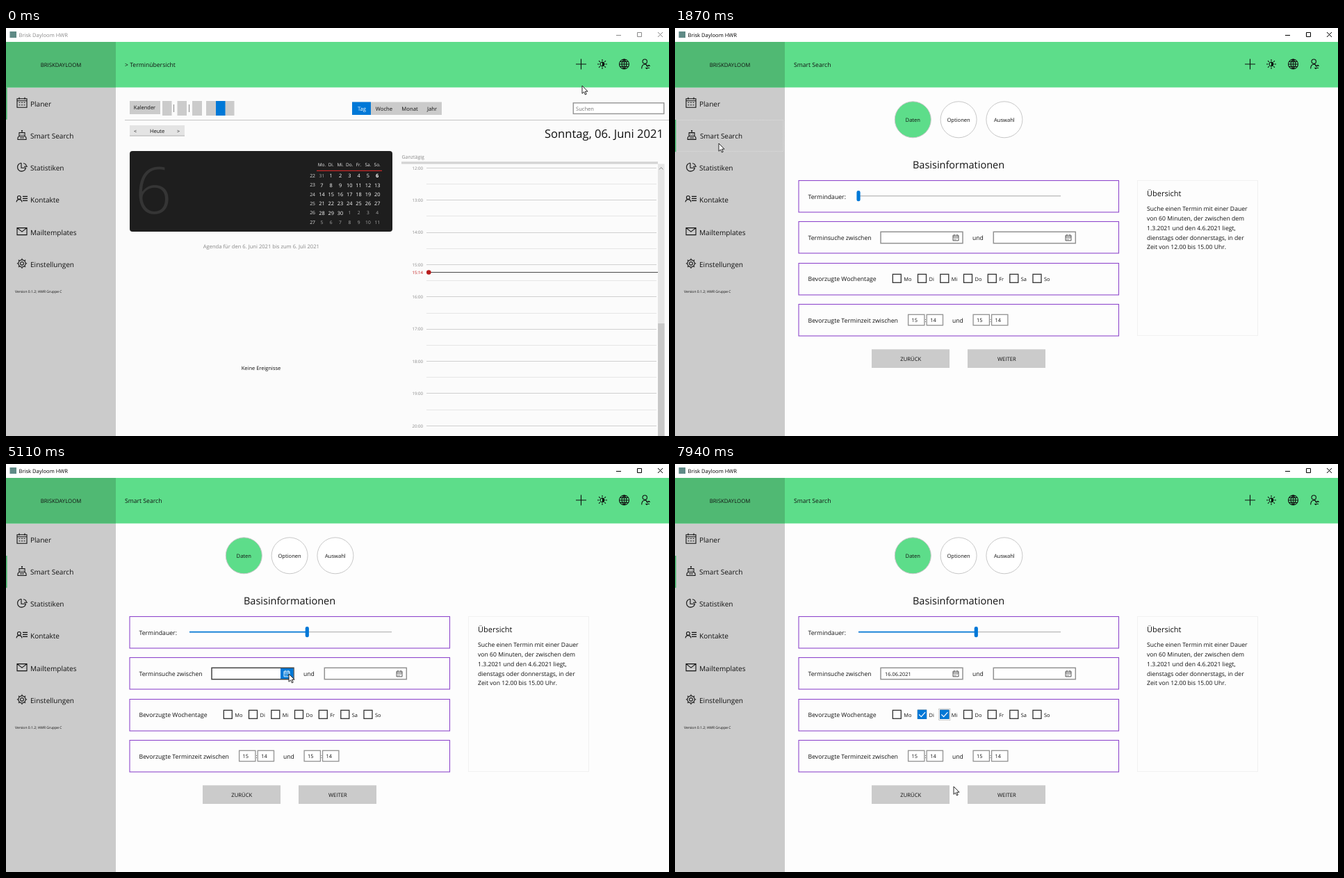
An HTML page that plays this animation: 954x587 px, repeating every 8000 ms.

```html
<!DOCTYPE html>
<html lang="de">
<head>
<meta charset="utf-8">
<title>Brisk Dayloom HWR</title>
<style>
html, body { margin: 0; width: 100%; height: 100%; overflow: hidden; background: #fff; }
svg { display: block; width: 954px; height: 587px; font-family: "Open Sans", "Noto Sans", sans-serif; text-rendering: geometricPrecision; }
text { white-space: pre; }
.icon { fill: none; stroke: #111; stroke-width: 1.1; }
</style>
</head>
<body>
<svg id="stage" viewBox="0 0 954 587"></svg>
<script>
const BLUE = '#0078d7', GRAY = '#cbcbcb', GREEN = '#5ddd8a';

const text = (x, cy, size, str, fill = '#111', anchor = 'start', extra = '') =>
  `<text x="${x}" y="${cy + size * 0.36}" font-size="${size}" fill="${fill}" text-anchor="${anchor}" ${extra}>${str}</text>`;
const mid = (x, cy, size, str, fill, extra) => text(x, cy, size, str, fill, 'middle', extra);
const rect = (x, y, w, h, fill, extra = '') =>
  `<rect x="${x}" y="${y}" width="${w}" height="${h}" fill="${fill}" ${extra}/>`;
const frame = (x, y, w, h, stroke, sw = 1, extra = '') =>
  rect(x, y, w, h, 'none', `stroke="${stroke}" stroke-width="${sw}" ${extra}`);
const line = (d, stroke, sw = 1, extra = '') =>
  `<path d="${d}" fill="none" stroke="${stroke}" stroke-width="${sw}" ${extra}/>`;
const icon = (x, y, d) => `<path class="icon" transform="translate(${x} ${y})" d="${d}"/>`;
const group = (id, body, extra = '') => `<g id="${id}" ${extra}>${body}</g>`;
const circle = r => `M${-r} 0a${r} ${r} 0 1 0 ${2 * r} 0a${r} ${r} 0 1 0 ${-2 * r} 0`;
const spokes = (n, r1, r2) => Array.from({ length: n }, (_, i) => {
  const a = i * 2 * Math.PI / n, c = Math.cos(a), s = Math.sin(a);
  return `M${c * r1} ${s * r1}L${c * r2} ${s * r2}`;
}).join('');

// Month sheet for June 2021, starting on Monday 31 May
function monthGrid(x, y, dx, dy, size, ink, dim, weekInk) {
  let out = '';
  for (let i = 0; i < 42; i++) {
    const col = i % 7, row = Math.floor(i / 7), june = i > 0 && i < 31;
    const day = i === 0 ? 31 : june ? i : i - 30;
    if (!col) out += mid(x - dx, y + row * dy, size * 0.93, 22 + row, weekInk);
    out += mid(x + col * dx, y + row * dy, june ? size : size * 0.9, day, june ? ink : dim,
      i === 6 ? 'font-weight="700"' : '');
  }
  return out;
}
const weekdays = ['Mo', 'Di', 'Mi', 'Do', 'Fr', 'Sa', 'So'];

function titleBar() {
  return rect(0, 0, 954, 20, '#fff') + rect(5.5, 5, 9.5, 9, '#5f8a85') +
    group('title', text(18.5, 10, 7.6, 'Brisk Dayloom HWR', 'currentColor') +
      line('M878 10.5h7M908.5 6.5h6v6h-6zM938 6l7 7M945 6l-7 7', 'currentColor'));
}

function header() {
  const user = `M-4.3 7.5c0-8 8.2-8 8.5-2.5` + `M-3-2.8a3.2 3.2 0 1 0 6.4 0a3.2 3.2 0 1 0-6.4 0` +
    'M2 3.5h5l-1.5-1.5M7 6.5h-5l1.5 1.5';
  return rect(0, 20, 954, 65.5, GREEN) + rect(0, 20, 158, 65.5, '#50b973') +
    mid(79, 53, 7.8, 'BRISKDAYLOOM') +
    icon(827.5, 52, 'M-7.5 0h15M0-7.5v15') +
    icon(858, 52, circle(2.9) + spokes(8, 4.5, 7)) +
    `<path d="M858 49a3 3 0 0 1 0 6z"/>` +
    icon(889.5, 52, circle(7) + 'M-7 0h14M-6-3.5h12M-6 3.5h12M0-7v14M0-7c-4.5 4-4.5 10 0 14M0-7c4.5 4 4.5 10 0 14') +
    icon(919, 51, user);
}

function sidebar() {
  const glyphs = [
    'M-7-6h14v12.5h-14zM-7-3h14M-4-8v3M4-8v3M-4.5-.5h2M-1-.5h2M2.5-.5h2M-4.5 3h2M-1 3h2M2.5 3h2',
    'M-4-3.5h8v5h-8zM-2-1h1M1-1h1M0-3.5v-3M-1-6.5h2M-6 6.5v-2c0-2 2-3 3-3h6c1 0 3 1 3 3v2zM-3 4h6',
    'M-1-6a6 6 0 1 0 6.5 7M-1-6v7h7M2-5.5a5 5 0 0 1 4.5 4M3-1h5',
    'M-6.5-2.5a2.4 2.4 0 1 0 4.8 0a2.4 2.4 0 1 0-4.8 0M-8 4c1-5 7-5 8 0M1-4h7M1-1h7M1 2h7',
    'M-7-5h14v10h-14zM-7-5l7 5.5l7-5.5',
    circle(2.3) + circle(5.2) + spokes(8, 5.2, 7.2)
  ];
  const names = ['Planer', 'Smart Search', 'Statistiken', 'Kontakte', 'Mailtemplates', 'Einstellungen'];
  return rect(0, 85.5, 158, 502, GRAY) + names.map((name, i) => {
    const cy = 108.8 + i * 46.2;
    const body = icon(23, cy - 1, glyphs[i]) + text(35, cy + 0.3, 10.05, name);
    return i !== 1 ? body : group('search',
      rect(0, 132, 158, 46, '#999', 'id="press"') +
      frame(0.5, 132, 157, 46, '#e2e2e2', 0.8, 'id="focus" stroke-dasharray="1 1"') + body);
  }).join('') +
    rect(0, 85.5, 1.6, 46.2, '#4bb871', 'id="bar"') +
    text(13, 379.5, 5, 'Version 0.1.2; HWR Gruppe C');
}

function planner() {
  let out = rect(158, 85.5, 796, 502, '#fbfbfb') + text(171, 53, 8.65, '&gt; Terminübersicht');
  out += rect(178, 105, 44, 19, GRAY) + mid(199.5, 114.5, 7.5, 'Kalender');
  for (const [x, w] of [[225, 13.5], [246.5, 13.5], [268, 14], [288, 40.5]]) out += rect(x, 105, w, 21, GRAY);
  out += rect(302, 105, 13.5, 21, BLUE) + line('M241.5 110v11M263.5 110v11', '#888');
  out += rect(498, 106.5, 129, 18.5, GRAY) + rect(498, 106.5, 27, 18.5, BLUE);
  [[512, 'Tag'], [544, 'Woche'], [581, 'Monat'], [613, 'Jahr']].forEach(([x, s], i) =>
    out += mid(x, 116, 7.7, s, i ? '#111' : '#fff'));
  out += rect(816.3, 107.8, 130.4, 15.6, '#fff', 'stroke="#949494" stroke-width="1.4"') + text(820, 116, 7.6, 'Suchen', '#777');
  out += line('M171 132.5h783', '#c4c4c4');
  out += rect(178, 140, 79, 16, '#e4e4e4') + rect(178, 154, 79, 2, '#cfcfcf') +
    mid(186, 148.3, 7, '&lt;') + mid(217.5, 148.3, 7.5, 'Heute') + mid(248, 148.3, 7, '&gt;');
  out += text(946, 152.5, 16.6, 'Sonntag, 06. Juni 2021', '#111', 'end');

  out += rect(178, 177, 378, 116, '#1e1e1e', 'rx="4"');
  out += '<text x="185.5" y="267" font-size="93" font-weight="300" fill="#353535">6</text>';
  weekdays.forEach((d, i) => out += mid(454.4 + 13.3 * i, 197, 6.5, d + '.', '#eee'));
  out += line('M447 205.3h94', '#c62828', 1.3) + monthGrid(454.4, 212.7, 13.3, 13.3, 7.4, '#fff', '#aaa', '#ddd');
  out += mid(367.3, 314, 7.6, 'Agenda für den 6. Juni 2021 bis zum 6. Juli 2021', '#888');
  out += mid(367, 489.5, 7.5, 'Keine Ereignisse');

  out += text(569.5, 185, 7, 'Ganztägig', '#888') + rect(569, 192.3, 369, 3.3, '#d4d4d4');
  for (let i = 0; i < 9; i++) {
    const y = 201.4 + 46.37 * i;
    out += text(600, y, 6.1, `${12 + i}:00`, '#888', 'end') +
      line(`M605 ${Math.floor(y) + 0.5}H936`, '#d0d0d0') + line(`M605 ${Math.floor(y + 23.2) + 0.5}H936`, '#e6e6e6');
  }
  out += text(600, 352.3, 6.1, '15:14', '#c01818', 'end') + line('M605 351.5H938', '#4a4a4a', 1.1) +
    '<circle cx="608.3" cy="351.5" r="3.3" fill="#b71c1c"/>';
  out += rect(938, 195.5, 9.5, 392, '#e6e6e6') + rect(938, 425, 9.5, 162, '#c8c8c8') + line('M940 203.5l2.7-3l2.7 3', '#888');
  return out;
}

const sheetIcon = color => line('M400 298.3h8v7.6h-8zM400 300.6h8M402 297v2M406 297v2M401.5 302.5h1M403.5 302.5h1M405.5 302.5h1M401.5 304.3h1M403.5 304.3h1', color, 0.9);

function search() {
  let out = rect(158, 85.5, 796, 502, '#fdfdfd') + text(171, 53, 8.65, 'Smart Search');
  ['Daten', 'Optionen', 'Auswahl'].forEach((s, i) => {
    const x = 342.3 + 65.8 * i;
    out += `<circle cx="${x}" cy="131.8" r="26" fill="${i ? '#fff' : GREEN}" stroke="#c8c8c8"/>` + mid(x, 132.3, 7.6, s);
  });
  out += mid(408, 196.5, 14.5, 'Basisinformationen');
  for (let i = 0; i < 4; i++) out += frame(178, Math.round(219 + 59.3 * i) + 0.5, 460.5, 45.5, '#8f48cc', 1.1);
  ['Termindauer:', 'Terminsuche zwischen', 'Bevorzugte Wochentage', 'Bevorzugte Terminzeit zwischen'].forEach((s, i) =>
    out += text(191.5, 242.7 + 59.3 * i, 8.7, s));

  out += line('M264 241.6H555', '#b8b8b8', 1.2) + rect(264, 240.8, 0, 1.7, BLUE, 'id="fill"') +
    rect(-2.6, 234, 5.2, 15.3, BLUE, 'id="thumb" rx="2.4"');

  out += rect(296, 293.3, 118, 16.4, '#fff', 'id="from" stroke-width="1.5"') +
    group('fromBtn', rect(395, 294, 18.5, 15, BLUE) + sheetIcon('#fff')) +
    group('fromIcon', sheetIcon('#444')) +
    text(302, 302, 7.4, '16.06.2021', '#111', 'start', 'id="date"');
  out += group('until', text(428, 302, 8.6, 'und') + rect(458.3, 293.3, 118, 16.4, '#fff', 'stroke="#929292" stroke-width="1.5"') +
    `<g transform="translate(162 0)">${sheetIcon('#444')}</g>`);

  const boxes = [313.3, 349.5, 381.8, 415.5, 450.3, 481.8, 515];
  weekdays.forEach((d, i) => {
    const x = boxes[i];
    out += frame(x, 354.3, 12, 12, '#333', 1.3) + text(x + 16, 361, 7.4, d);
    if (i === 1 || i === 2) {
      out += group('check' + d, rect(x - 0.6, 353.7, 13.2, 13.2, BLUE) + line(`M${x + 1.6} 360.3l3.2 3.3l5.8-6.4`, '#fff', 1.2)) +
        frame(x - 2.2, 352.2, 16.4, 16.4, '#888', 0.8, `id="ring${d}" stroke-dasharray="1 1"`);
    }
  });

  [335.6, 362.2, 429.1, 455.6].forEach((x, i) =>
    out += rect(x, 412.3, 23.3, 15.4, '#fff', 'stroke="#929292" stroke-width="1.3"') + text(x + 5, 420.2, 7.4, i % 2 ? 14 : 15));
  out += mid(360.6, 420, 7.4, ':') + mid(454.1, 420, 7.4, ':') + text(399, 420.6, 8.6, 'und');
  out += rect(283, 462.3, 112, 26.7, GRAY) + mid(339.3, 476, 7.7, 'ZURÜCK') +
    rect(421, 462.3, 112, 26.7, GRAY) + mid(477.3, 476, 7.7, 'WEITER');

  out += frame(665.5, 219.5, 173, 223, '#f1f1f1') + text(679, 238, 11, 'Übersicht');
  ['Suche einen Termin mit einer Dauer', 'von 60 Minuten, der zwischen dem', '1.3.2021 und den 4.6.2021 liegt,',
    'dienstags oder donnerstags, in der', 'Zeit von 12.00 bis 15.00 Uhr.'].forEach((s, i) =>
    out += text(679, 260 + 13.8 * i, 8.65, s));

  let popup = rect(295.5, 311.5, 147, 157, '#fff', 'stroke="#c4c4c4"') +
    mid(303, 324, 7.5, '&lt;') + mid(322, 324, 7.6, 'Juni') + mid(341, 324, 7.5, '&gt;') +
    mid(397, 324, 7.5, '&lt;') + mid(416, 324, 7.6, '2021') + mid(435, 324, 7.5, '&gt;');
  weekdays.forEach((d, i) => popup += mid(322.5 + 18.3 * i, 342, 6.5, d, '#666'));
  popup += monthGrid(322.5, 358, 18.3, 19, 7.2, '#111', '#999', '#888');
  return out + group('popup', popup);
}

stage.innerHTML = group('planner', planner()) + group('searchPage', search()) + sidebar() + header() + titleBar();
// Page captions belong above the green header
for (const id of ['planner', 'searchPage']) {
  const caption = document.querySelector(`#${id} > text`);
  caption.id = id + 'Caption';
  stage.append(caption);
}
stage.insertAdjacentHTML('beforeend',
  '<path id="cursor" d="M0 0V11.3L2.6 8.9L4.4 12.9L6.2 12.1L4.4 8.2H8Z" fill="#fff" stroke="#111" stroke-width=".9"/>');

const $ = id => document.getElementById(id);
const show = (id, on) => { $(id).style.display = on ? '' : 'none'; };

// Pointer samples come in runs: first time, last time, count
const ticks = [0];
for (const [a, b, n] of [[120, 1150, 8], [1270, 1990, 7], [2140, 2140, 1], [2390, 3430, 9], [3580, 4540, 8],
  [4690, 5110, 4], [5230, 5620, 4], [5740, 6530, 6], [6650, 6770, 2], [6890, 7820, 8], [7940, 7940, 1]])
  for (let i = 0; i < n; i++) ticks.push(n > 1 ? a + (b - a) * i / (n - 1) : a);

const path = [[0, 829, 83], [120, 838, 72], [400, 862, 46], [560, 770, 62], [1000, 110, 140], [1270, 64, 162],
  [1630, 63, 166], [2140, 63, 166], [2520, 85, 172], [3000, 180, 152], [3430, 244, 160], [3580, 250, 180],
  [3850, 264, 241], [3990, 264, 241], [4540, 422, 245], [4690, 433, 246], [4830, 433, 249], [5110, 407, 302],
  [5350, 407, 303], [5900, 361, 396], [6060, 361, 396], [6530, 342, 291], [6770, 346, 325], [7020, 355, 359],
  [7160, 355, 360], [7420, 387, 360], [7820, 389, 362], [7940, 401, 464], [8000, 401, 464]];

function pointer(t) {
  const i = path.findIndex(p => p[0] > t), [t0, x0, y0] = path[i - 1], [t1, x1, y1] = path[i];
  const k = (t - t0) / (t1 - t0);
  return [x0 + (x1 - x0) * k, y0 + (y1 - y0) * k];
}

function draw(now) {
  const t = now % 8000, tick = ticks.filter(v => v <= t).pop();
  const within = (a, b) => t >= a && t < b;
  const [x, y] = pointer(tick);
  $('cursor').setAttribute('transform', `translate(${x} ${y})`);

  const searching = t >= 1870;
  for (const s of ['', 'Caption']) {
    show('planner' + s, !searching);
    show('searchPage' + s, searching);
  }
  $('bar').setAttribute('y', searching ? 132 : 85.5);
  $('title').style.color = t < 1630 ? '#8a8a8a' : '#000';

  const scale = within(1630, 1870) ? 0.955 : within(1870, 1990) ? 0.98 : 1;
  $('search').setAttribute('transform', `translate(79 155) scale(${scale}) translate(-79 -155)`);
  show('press', within(1630, 1870));
  show('focus', within(1150, 3900));

  const value = tick < 3990 ? 264 : tick < 4690 ? x : 433.3;
  $('thumb').setAttribute('transform', `translate(${value} 0)`);
  $('fill').setAttribute('width', value - 264);

  const hover = within(4960, 5230), editing = within(5230, 7150);
  $('from').setAttribute('stroke', editing ? BLUE : hover ? '#444' : '#929292');
  $('from').setAttribute('width', editing ? 119.4 : 118);
  show('fromBtn', hover);
  show('fromIcon', !hover);
  for (const id of ['fromIcon', 'until']) $(id).setAttribute('transform', `translate(${editing ? 1.2 : 0} 0)`);
  show('popup', within(5350, 6050));
  show('date', t >= 6050);

  show('checkDi', t >= 7150);
  show('ringDi', within(7150, 7550));
  show('checkMi', t >= 7550);
  show('ringMi', t >= 7550);
}

const start = performance.now();
function loop() {
  draw(performance.now() - start);
  requestAnimationFrame(loop);
}
loop();
</script>
</body>
</html>
```
